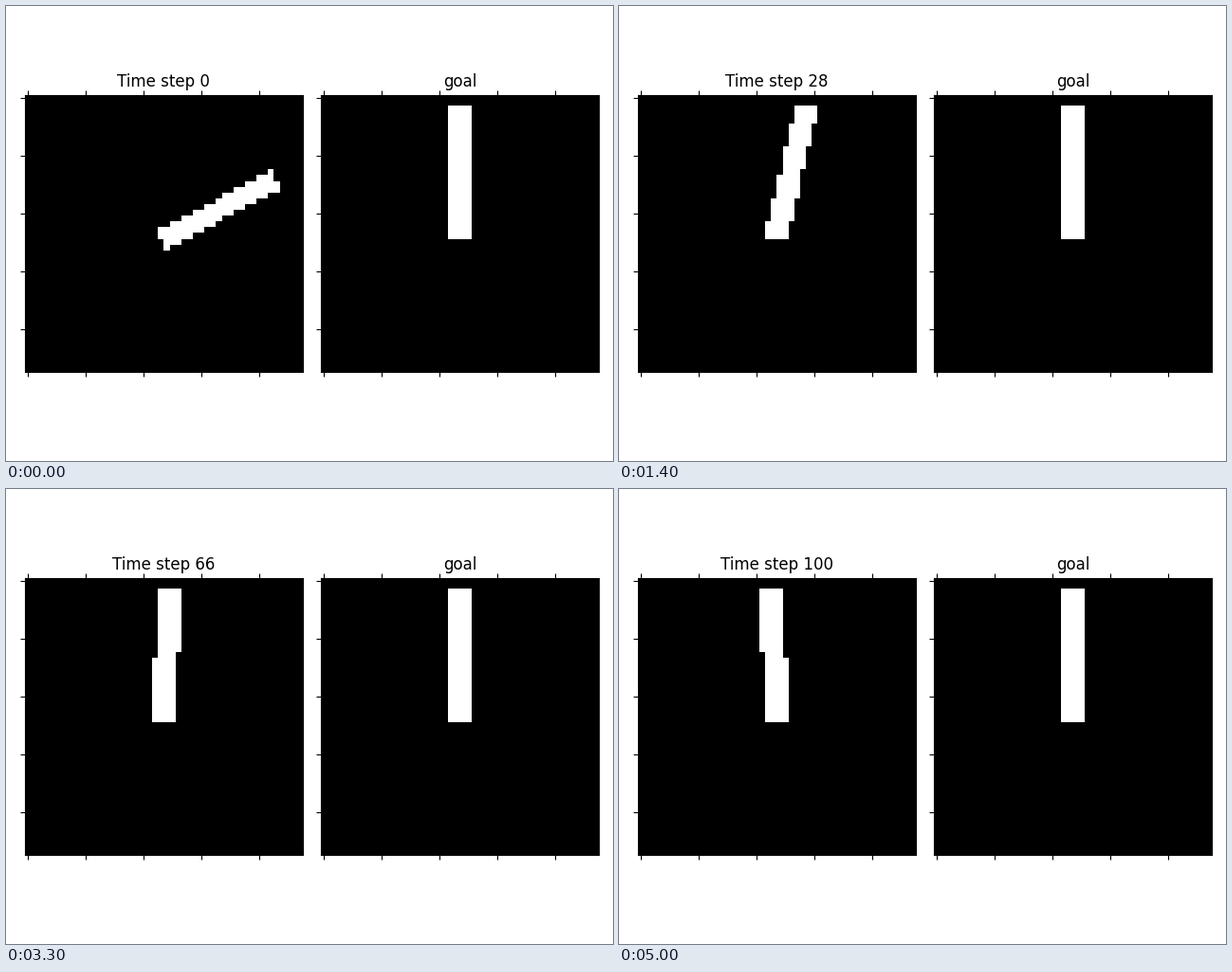
These frames come from a looping animation (640x480 px, 5.05 s). A matplotlib script:

```python
import math

import numpy as np
import matplotlib.pyplot as plt
from matplotlib.animation import FuncAnimation

W, H, DPI = 640, 480, 100
GRID, PIVOT, LENGTH, THICK = 48, 24, 22, 4
STEPS, INTERVAL = 101, 50

# Turning points of the swing: (time step, angle in degrees from upright)
TURNS = [(0, 64), (19, -29.7), (30, 18), (39, -12), (47, 11.5), (53, -5.5),
         (64, 4.5), (71, -4), (79, 1.5), (86, -1.5), (93, 1.5), (106, -1.5)]


def angle(step):
    for (t0, a0), (t1, a1) in zip(TURNS, TURNS[1:]):
        if step <= t1:
            ease = (1 - math.cos(math.pi * (step - t0) / (t1 - t0))) / 2
            return math.radians(a0 + (a1 - a0) * ease)


def half_down(v):
    return int(math.copysign(math.ceil(abs(v) - 0.5), v))


def half_up(v):
    return int(math.copysign(math.floor(abs(v) + 0.5), v))


def rod_corners(theta):
    """Corners of a thick line from the pivot, snapped to the grid."""
    x0 = y0 = PIVOT
    x1 = int(PIVOT + LENGTH * math.sin(theta))
    y1 = int(PIVOT - LENGTH * math.cos(theta))
    dx, dy = x1 - x0, y1 - y0
    size = math.hypot(dx, dy)
    thin, wide = (THICK - 1) // 2 / size, THICK // 2 / size
    left, right = half_down(thin * dy), half_down(wide * dy)
    up, down = half_up(thin * dx), half_up(wide * dx)
    return [(x0 - left, y0 + down), (x1 - left, y1 + down),
            (x1 + right, y1 - up), (x0 + right, y0 - up)]


def render(theta):
    """Scan-fill the rod into a black square image."""
    img = np.zeros((GRID, GRID))
    pts = rod_corners(theta)
    edges = list(zip(pts, pts[1:] + pts[:1]))
    for y in range(min(p[1] for p in pts), max(p[1] for p in pts) + 1):
        xs = []
        for (xa, ya), (xb, yb) in edges:
            if ya != yb and min(ya, yb) <= y <= max(ya, yb):
                xs.append(xa + (y - ya) * (xb - xa) / (yb - ya))
        img[y, half_up(min(xs)):half_down(max(xs)) + 1] = 1
    return img


PAD, TICK = 15, 3.5 * DPI / 72
SIDE = (W - 3 * PAD - 2 * TICK) / 2

fig = plt.figure(figsize=(W / DPI, H / DPI), dpi=DPI)


def panel(col, theta, title):
    x = PAD + TICK + col * (SIDE + PAD + TICK)
    ax = fig.add_axes([x / W, (H - SIDE) / 2 / H, SIDE / W, SIDE / H])
    img = ax.matshow(render(theta), cmap="gray", vmin=0, vmax=1)
    ax.set_xticks(range(0, GRID, 10))
    ax.set_yticks(range(0, GRID, 10))
    ax.tick_params(labeltop=False, labelbottom=False, labelleft=False)
    return img, ax.set_title(title)


rod, label = panel(0, angle(0), "Time step 0")
panel(1, 0, "goal")


def update(step):
    rod.set_data(render(angle(step)))
    label.set_text(f"Time step {step}")
    return rod, label


anim = FuncAnimation(fig, update, frames=STEPS, interval=INTERVAL,
                     repeat=True, repeat_delay=0)
plt.show()
```
